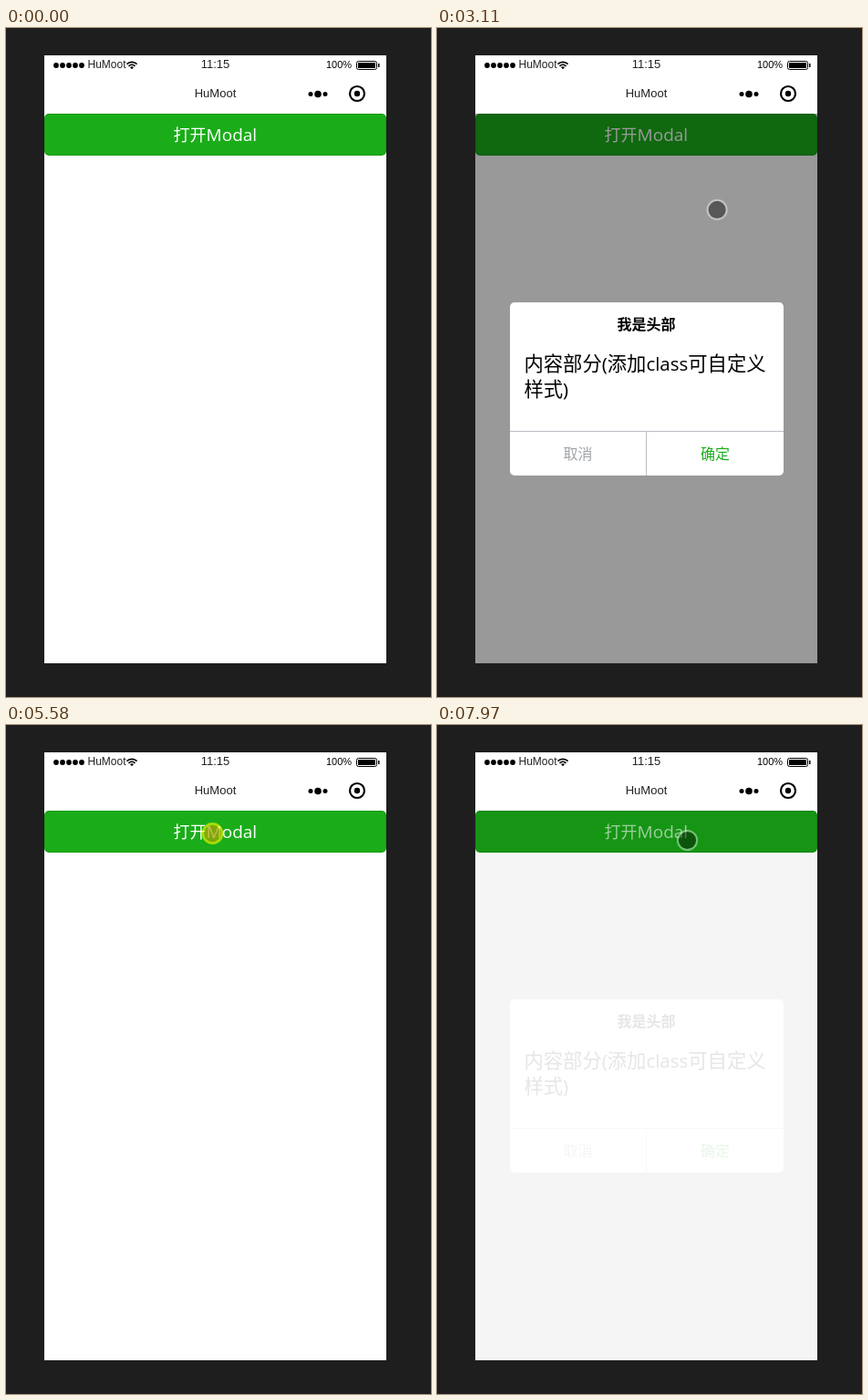
These frames come from a looping animation (466x734 px, 7990 ms). An HTML page:

```html
<!DOCTYPE html>
<html lang="zh">
<head>
<meta charset="utf-8">
<title>Modal</title>
<style>
  html, body { margin: 0; width: 100%; height: 100%; overflow: hidden; background: #1e1e1e; }
  svg { display: block; }
  text { font-family: "Noto Sans CJK SC", "Noto Sans CJK", sans-serif; }
  .bar { font-family: "Liberation Sans", sans-serif; fill: #222; }
  .latin { font-family: "Open Sans", sans-serif; }
  .mid { text-anchor: middle; }
  .body { font-size: 21.3px; font-weight: 350; }
  .body .latin { font-size: 20.5px; font-weight: 400; }
</style>
</head>
<body>
<svg width="466" height="734" viewBox="0 0 466 734">
  <rect x="42" y="30" width="375" height="667" fill="#fff"/>

  <!-- status bar -->
  <path d="M55 41h28.1" stroke="#000" stroke-width="5.8" stroke-linecap="round" stroke-dasharray="0 7"/>
  <text class="bar" x="89.5" y="44" font-size="12">HuMoot</text>
  <g fill="none" stroke="#000" stroke-width="1.7">
    <path d="M132.4 39.6a8 8 0 0 1 11.2 0M134.5 41.9a5 5 0 0 1 7 0"/>
    <path d="M138 45.2l-2-2.1a3 3 0 0 1 4 0z" fill="#000" stroke="none"/>
  </g>
  <text class="bar mid" x="229.5" y="44" font-size="13">11:15</text>
  <text class="bar" x="351" y="44" font-size="11" style="fill:#000">100%</text>
  <rect x="384.5" y="36.5" width="22" height="9" rx="2" fill="none" stroke="#000"/>
  <path d="M386 38h19v6h-19zM408 39h1.5v4h-1.5z"/>

  <!-- navigation bar -->
  <text class="bar mid" x="229.5" y="76" font-size="13">HuMoot</text>
  <circle cx="334" cy="72.5" r="2.5"/>
  <circle cx="342" cy="72.5" r="3.8"/>
  <circle cx="350" cy="72.5" r="2.5"/>
  <circle cx="385" cy="72" r="8" fill="none" stroke="#000" stroke-width="2.2"/>
  <circle cx="385" cy="72" r="3.2"/>

  <rect id="button" x="42" y="94" width="375" height="46" rx="5"/>
  <rect x="42.5" y="94.5" width="374" height="45" rx="4.5" fill="none" stroke="#000" stroke-opacity=".1"/>
  <text id="label" x="183.5" y="124" font-size="18" fill="#fff">打开<tspan class="latin" font-size="19">Modal</tspan></text>

  <g id="modal">
    <path d="M42 94h375v603h-375z" fill-opacity=".4"/>
    <rect x="80" y="301" width="300" height="190" rx="5" fill="#fff"/>
    <path d="M80 442.5h300M229.5 442v49" stroke="#bbbec4"/>
    <text class="mid" x="229.5" y="330.5" font-size="16" font-weight="700">我是头部</text>
    <text class="body" x="95.5" y="376">内容部分<tspan class="latin">(</tspan>添加<tspan class="latin">class</tspan>可自定义</text>
    <text class="body" x="95.5" y="404">样式<tspan class="latin">)</tspan></text>
    <text class="mid" x="154.5" y="473" font-size="16" fill="#a0a4a8">取消</text>
    <text class="mid" x="305" y="473" font-size="16" font-weight="500" fill="#1aad19">确定</text>
  </g>

  <g id="cursor">
    <circle id="dot" r="9.6"/>
    <circle id="ring" r="10.6" fill="none"/>
  </g>
</svg>
<script>
const LOOP = 7990, FADE = 350, HOVER = 110;
const [button, label, modal, cursor, dot, ring] =
  ["button", "label", "modal", "cursor", "dot", "ring"].map(id => document.getElementById(id));

// each move eases to its end, curving towards "bend" if given
const entry = [411, 694];
const moves = [
  { start: 410, end: 610, to: [380, 75], bend: [346, 380] },
  { start: 810, end: 1370, to: [254.5, 143.5], bend: [280, 215] },
  { start: 2080, end: 2190, to: [271, 118] },
  { start: 2600, end: 3500, to: [178.5, 465.5], bend: [416, 26] },
  { start: 4210, end: 4950, to: [226.5, 119] },
  { start: 5720, end: 6620, to: [304.5, 477], bend: [496, 300] },
  { start: 6980, end: 7730, to: [274.5, 126.5] }
];

// clicks open and close the modal in turn
const clicks = [
  { down: 2210, up: 2460 },
  { down: 3880, up: 4000 },
  { down: 5580, up: 5680 },
  { down: 6800, up: 6950 },
  { down: 7780, up: 7930 }
];
const opening = clicks.filter((_, i) => i % 2 === 0);

const clamp = v => Math.max(0, Math.min(1, v));
const lerp = (a, b, u) => a.map((v, k) => v + (b[k] - v) * u);

function position(t) {
  let at = entry;
  for (const { start, end, to, bend } of moves) {
    if (t < start) break;
    const u = clamp((t - start) / (end - start)), s = u * u * (3 - 2 * u);
    const mid = bend || lerp(at, to, .5);
    at = lerp(lerp(at, mid, s), lerp(mid, to, s), s);
  }
  return at;
}

function draw(t) {
  const pressed = clicks.some(c => t >= c.down && t < c.up);
  const hover = opening.some(c => t >= c.up && t < c.up + HOVER);
  button.style.fill = hover ? "#179b16" : "#1aad19";
  label.style.fillOpacity = hover ? .6 : 1;
  modal.style.opacity = clicks.reduce((sum, c, i) =>
    sum + (i % 2 ? -1 : 1) * clamp((t - c.up - 8) / FADE), 0);
  cursor.style.display = t < moves[0].start ? "none" : "";
  cursor.setAttribute("transform", `translate(${position(t)})`);
  dot.style.fill = pressed ? "rgba(170,165,0,.7)" : "rgba(0,0,0,.43)";
  ring.style.stroke = pressed ? "rgba(255,255,0,.6)" : "rgba(255,255,255,.4)";
  ring.style.strokeWidth = pressed ? 2.6 : 2;
}

const begin = performance.now();
function tick() {
  draw((performance.now() - begin) % LOOP);
  requestAnimationFrame(tick);
}
tick();
</script>
</body>
</html>
```
